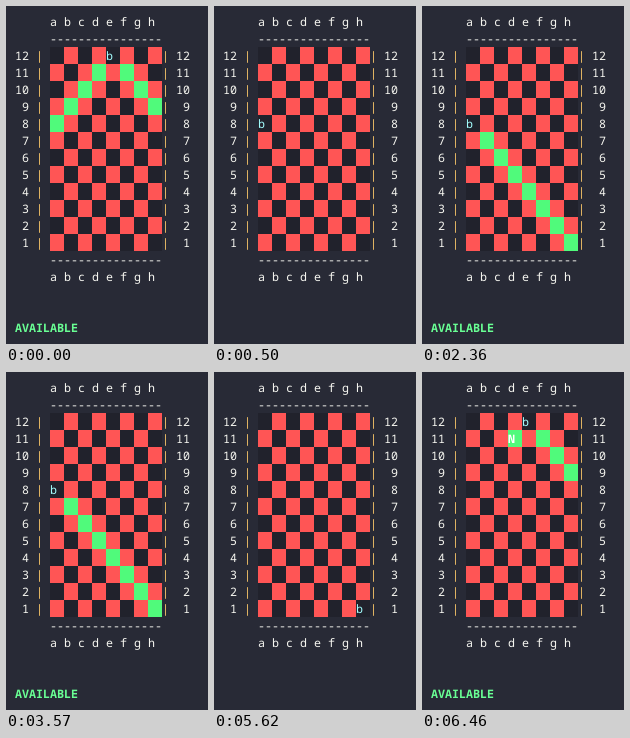
An HTML page that plays this animation: 202 px wide and 338 px high, repeating every 8 s.

```html
<!DOCTYPE html>
<html lang="en">
<head>
<meta charset="utf-8">
<style>
  html, body { margin: 0; width: 100%; height: 100%; overflow: hidden; background: #282a36; }
  svg { display: block; width: 202px; height: 338px; }
  text {
    font: 11.667px "Noto Sans Mono", "DejaVu Sans Mono", monospace;
    fill: #f8f8f2; white-space: pre; text-rendering: geometricPrecision;
  }
  .bar { fill: #ffcb6b; }
  .status { fill: #69ff94; font-weight: bold; }
  .bishop { fill: #a4ffff; font-weight: 500; }
  .knight { fill: #fff; font-weight: bold; }
</style>
</head>
<body>
<svg id="stage" viewBox="0 0 202 338"></svg>
<script>
const stage = document.getElementById('stage');
const FILES = 'abcdefgh', RANKS = 12, LOOP = 8000;
const CHAR = 7, LINE = 17, LEFT = 9, TOP = 7;
const RED = '#ff5555', DARK = '#21222c', GREEN = '#50fa7b';

// Each step: start time, bishop square, reachable squares, knight square
const STEPS = [
  { at: 0, bishop: 'e12', moves: 'd11 c10 b9 a8 f11 g10 h9' },
  { at: 500, bishop: 'a8' },
  { at: 2360, bishop: 'a8', moves: 'b7 c6 d5 e4 f3 g2 h1' },
  { at: 4370, bishop: 'h1' },
  { at: 6460, bishop: 'e12', moves: 'd11 f11 g10 h9', knight: 'd11' }
];

function add(tag, attrs, content = '') {
  const el = document.createElementNS('http://www.w3.org/2000/svg', tag);
  for (const key in attrs) el.setAttribute(key, attrs[key]);
  el.textContent = content;
  return stage.appendChild(el);
}

// Text on the terminal's character grid
function print(col, row, content, cls = '') {
  return add('text', { x: LEFT + col * CHAR, y: TOP + row * LINE + 13, class: cls }, content);
}

const rowOf = rank => 2 + RANKS - rank;
const colOf = file => 5 + file * 2;

const cells = {};
for (let rank = RANKS; rank > 0; rank--) {
  const row = rowOf(rank);
  [...FILES].forEach((name, file) => {
    const color = (file + rank) % 2 ? RED : DARK;
    const rect = add('rect', {
      x: LEFT + colOf(file) * CHAR, y: TOP + row * LINE,
      width: 2 * CHAR, height: LINE, 'shape-rendering': 'crispEdges'
    });
    cells[name + rank] = { rect, color };
  });
  const label = String(rank).padStart(2);
  print(0, row, label);
  print(3, row, '|', 'bar');
  print(21, row, '|', 'bar');
  print(23, row, label);
}
for (const row of [0, 15]) [...FILES].forEach((name, file) => print(colOf(file), row, name));
for (const row of [1, 14]) print(5, row, '-'.repeat(16));

const status = print(0, 18, 'AVAILABLE', 'status');
const bishop = print(0, 0, 'b', 'bishop');
const knight = print(0, 0, 'N', 'knight');

function place(piece, square) {
  piece.style.display = square ? '' : 'none';
  if (!square) return;
  piece.setAttribute('x', LEFT + colOf(FILES.indexOf(square[0])) * CHAR);
  piece.setAttribute('y', TOP + rowOf(+square.slice(1)) * LINE + 13);
}

let shown;
function draw(now) {
  const t = now % LOOP;
  const step = STEPS.findLast(s => s.at <= t);
  if (step !== shown) {
    shown = step;
    const moves = (step.moves || '').split(' ');
    for (const square in cells) {
      const { rect, color } = cells[square];
      rect.setAttribute('fill', moves.includes(square) ? GREEN : color);
    }
    place(bishop, step.bishop);
    place(knight, step.knight);
    status.style.display = step.moves ? '' : 'none';
  }
}

const start = performance.now();
function tick() {
  draw(performance.now() - start);
  requestAnimationFrame(tick);
}
tick();
</script>
</body>
</html>
```
